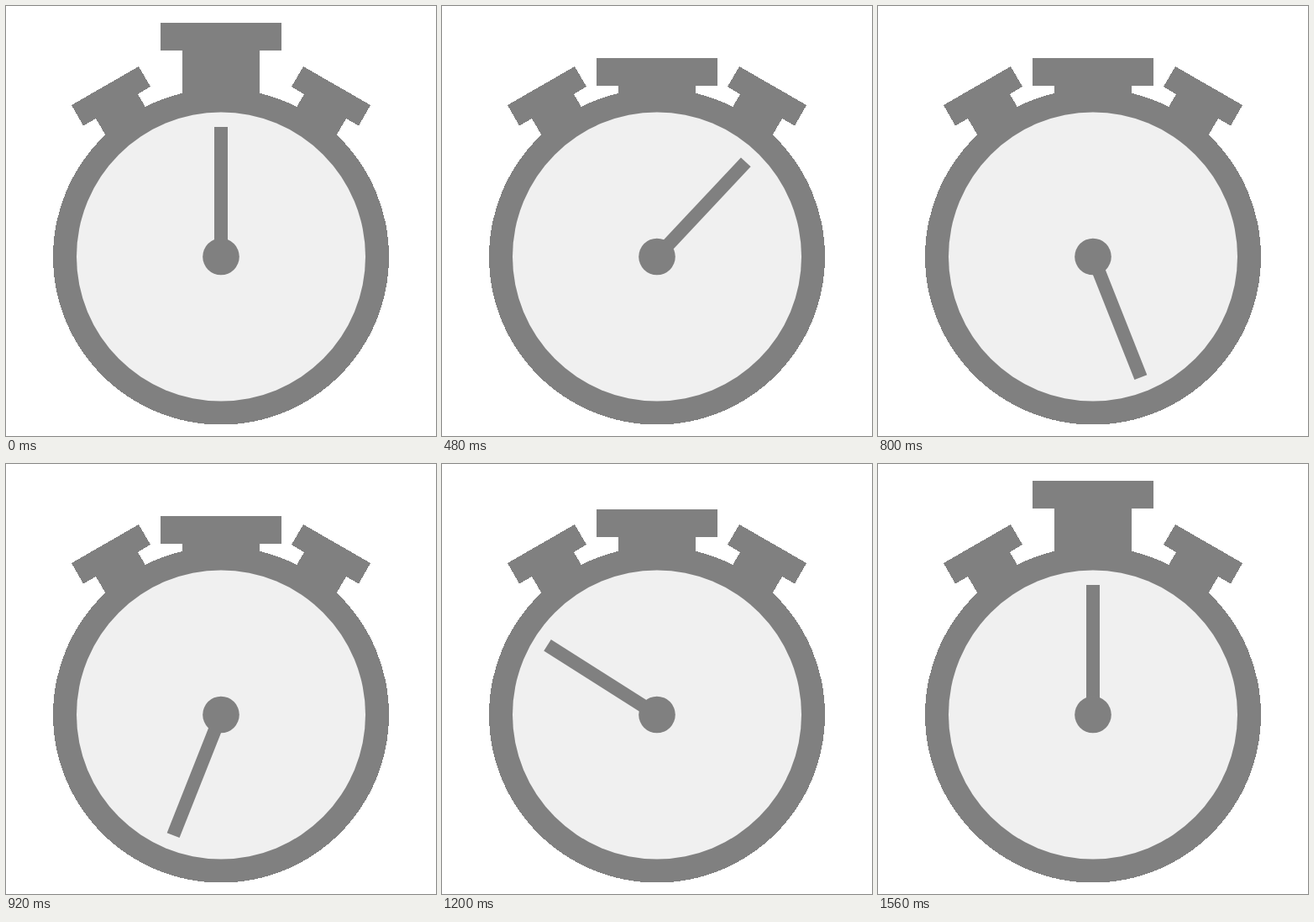
Animation of 512x512 px, one loop 1600 ms. Source, as an HTML page:

```html
<!DOCTYPE html>
<html lang="en">
<head>
<meta charset="utf-8">
<title>Stopwatch</title>
<style>
  html, body { margin: 0; width: 100%; height: 100%; overflow: hidden; background: #fff; }
  svg { display: block; width: 100vw; height: 100vh; }
</style>
</head>
<body>
<svg viewBox="0 0 512 512" fill="#808080">
  <g shape-rendering="crispEdges">
    <path id="crown" d="M184 20h144v33h-26v67h-92v-67h-26z"/>
    <path id="side" d="M354 72 434 118 420 142.500 405 134 384 170 337 136 355 105 340 96z"/>
    <use href="#side" transform="matrix(-1 0 0 1 512 0)"/>
    <circle cx="256" cy="298.500" r="200"/>
  </g>
  <circle cx="256" cy="298.500" r="172" fill="#f0f0f0"/>
  <path id="hand" d="M248 144h16v154.500h-16z"/>
  <circle cx="256" cy="298.500" r="21.800"/>
</svg>
<script>
  const STEP = 40, STEPS = 40;
  const crown = document.getElementById('crown');
  const hand = document.getElementById('hand');
  const progress = (step, from, to) => Math.min(1, Math.max(0, (step - from) / (to - from)));

  function draw() {
    const step = Math.floor(performance.now() / STEP) % STEPS;
    const press = Math.round(42 * (progress(step, 0, 9) - progress(step, 28, 39)));
    const angle = 360 * progress(step, 9, 34);
    crown.setAttribute('transform', `translate(0 ${press})`);
    hand.setAttribute('transform', `rotate(${angle} 256 298.5)`);
    requestAnimationFrame(draw);
  }
  draw();
</script>
</body>
</html>
```
